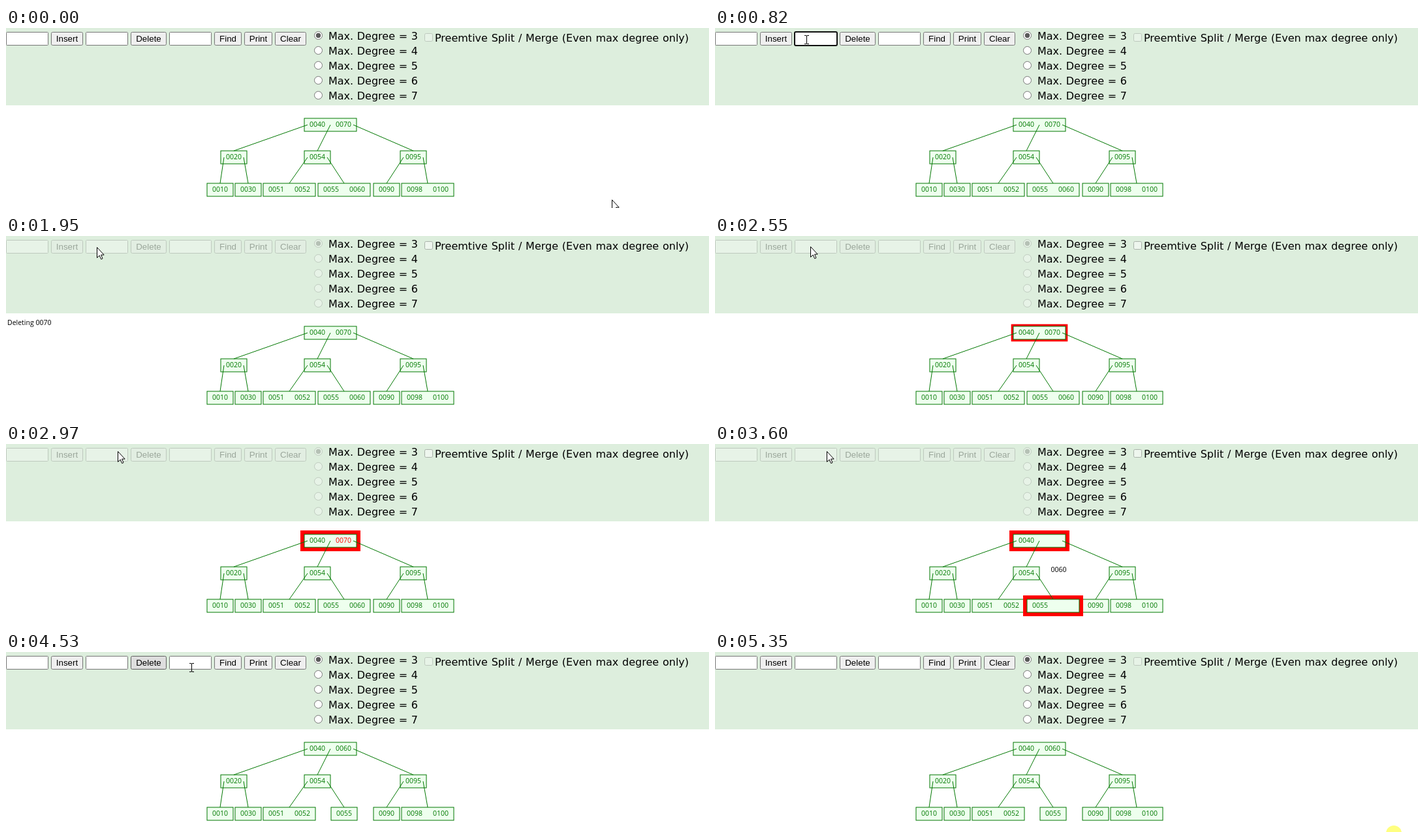
Animation, 1077 px wide and 277 px high, one loop 5420 ms. Source, as an HTML page:

```html
<!DOCTYPE html>
<html lang="en">
<head>
<meta charset="utf-8">
<title>B-tree deletion</title>
<style>
html, body { margin: 0; width: 100%; height: 100%; overflow: hidden; background: #fff; }
svg { display: block; }

.label { font: 16px "DejaVu Sans", sans-serif; word-spacing: .55px; }
.form text { font: 13.333px "Liberation Sans", Arial, sans-serif; }
.mid, .tree text { text-anchor: middle; }
.btn rect { y: 6.5px; height: 20px; rx: 2px; fill: #efefef; stroke: #767676; }
.field rect { y: 6.5px; width: 64px; height: 20px; rx: 1px; fill: #fff; stroke: #767676; }
.radio circle { fill: #fff; stroke: #767676; }
.radio .dot { fill: #5a5a5a; stroke: none; }

.tree text, .msg { font: 10.5px "Open Sans", "Noto Sans", sans-serif; }
.tree text { fill: #070; }
.tree rect { width: 40px; height: 20px; fill: #efe; stroke: #070; }
.tree rect.wide { width: 80px; }
.tree path { fill: none; stroke: #070; }
.tree rect.hot { fill: red; stroke: red; animation: pulse 5.42s linear infinite, 5.42s step-end infinite; }
.tree .moving { fill: #000; }

/* every timed part shares one clock */
.t { animation: 5.42s step-end infinite; }
.form { animation-name: disable; }
.box { animation-name: box; }
.ring { animation-name: ring; }
.key1 { animation-name: key1; }
.key2 { animation-name: key2; }
.caret { animation-name: key1, caret; animation-duration: 5.42s; animation-timing-function: step-end; animation-iteration-count: infinite; }
.msg { animation-name: msg; }
.btn rect.hover { animation-name: hover; }
.tree .hot.root { animation-name: pulse, hotRoot; }
.tree .hot.inner { animation-name: pulse, hotInner; }
.tree .hot.leaf { animation-name: pulse, hotLeaf; }
.old { animation-name: old; }
.new { animation-name: fresh; }
.pair { animation-name: pair; }
.taken { animation-name: taken; }
.single { animation-name: single; }
.moving { animation-name: move; }
.arrow { animation-name: arrow; }
.beam { animation-name: beam; }
.spot { animation-name: spot; }

@keyframes disable { 0% { opacity: 1 } 34.68% { opacity: .3 } 71.39%, 100% { opacity: 1 } }
@keyframes box { 0% { opacity: .3 } 34.68% { opacity: .5 } 83.57%, 100% { opacity: .3 } }
@keyframes ring { 0% { visibility: hidden } 12.73% { visibility: visible } 34.68%, 100% { visibility: hidden } }
@keyframes key1 { 0% { visibility: hidden } 26.19% { visibility: visible } 34.68%, 100% { visibility: hidden } }
@keyframes key2 { 0% { visibility: hidden } 28.04% { visibility: visible } 34.68%, 100% { visibility: hidden } }
@keyframes caret { 0% { transform: none } 28.04%, 100% { transform: translateX(7.4px) } }
@keyframes msg { 0% { visibility: hidden } 34.68% { visibility: visible } 42.06%, 100% { visibility: hidden } }
@keyframes hover { 0% { fill: #efefef; stroke: #767676 } 83.57% { fill: #dedede; stroke: #5f5f5f } 84.87%, 100% { fill: #efefef; stroke: #767676 } }

@keyframes pulse { 0%, 42.06% { stroke-width: 8.8px } 46.12% { stroke-width: 6px } 60.6% { stroke-width: 16px } 69%, 100% { stroke-width: 10.2px } }
@keyframes hotRoot { 0% { visibility: hidden } 42.06% { visibility: visible } 69%, 100% { visibility: hidden } }
@keyframes hotInner { 0% { visibility: hidden } 55.9% { visibility: visible } 62.54%, 100% { visibility: hidden } }
@keyframes hotLeaf { 0% { visibility: hidden } 63.83% { visibility: visible } 69%, 100% { visibility: hidden } }

@keyframes old { 0% { fill: #070; visibility: visible } 52.21% { fill: red; visibility: visible } 63.83%, 100% { fill: red; visibility: hidden } }
@keyframes fresh { 0% { visibility: hidden } 69%, 100% { visibility: visible } }
@keyframes pair { 0% { visibility: visible } 70.11%, 100% { visibility: hidden } }
@keyframes taken { 0% { visibility: visible } 63.83%, 100% { visibility: hidden } }
@keyframes single { 0% { visibility: hidden } 70.11%, 100% { visibility: visible } }
@keyframes move {
  0% { visibility: hidden; transform: none }
  63.83% { visibility: visible; transform: none }
  65.12% { visibility: visible; transform: translate(-5.8px, -27.5px) }
  66.41% { visibility: visible; transform: translate(-11.5px, -55px) }
  67.71% { visibility: visible; transform: translate(-17.3px, -82.5px) }
  69%, 100% { visibility: hidden; transform: none }
}

@keyframes arrow {
  0% { transform: translate(928px, 264px) }
  1.29% { transform: translate(905px, 257px) }
  2.58% { transform: translate(800px, 235px) }
  3.87% { transform: translate(650px, 195px) }
  5.16% { transform: translate(470px, 142px) }
  6.27% { transform: translate(298px, 88px) }
  7.56% { transform: translate(175px, 58px) }
  8.85% { transform: translate(114px, 44px) }
  10.14% { transform: translate(134px, 27px) }
  11.43% { transform: translate(0, 400px) }
  35.97% { transform: translate(139px, 17px) }
  42.06% { transform: translate(141px, 17px) }
  44.64% { transform: translate(146px, 16px) }
  47.23% { transform: translate(154px, 14px) }
  49.63% { transform: translate(161px, 13px) }
  50.92% { transform: translate(165px, 12px) }
  52.21% { transform: translate(169px, 11px) }
  53.5% { transform: translate(171px, 11px) }
  83.57% { transform: translate(0, 400px) }
  84.87% { transform: translate(340px, 42px) }
  86.16% { transform: translate(490px, 92px) }
  87.45% { transform: translate(660px, 148px) }
  88.74% { transform: translate(825px, 203px) }
  90.03% { transform: translate(963px, 249px) }
  91.32%, 100% { transform: translate(0, 400px) }
}
@keyframes beam {
  0% { transform: translate(0, 400px) }
  11.43% { transform: translate(139px, 20px) }
  12.73% { transform: translate(140px, 18px) }
  35.97% { transform: translate(0, 400px) }
  83.57% { transform: translate(284px, 24px) }
  84.87%, 100% { transform: translate(0, 400px) }
}
@keyframes spot { 0% { visibility: hidden } 98.7%, 100% { visibility: visible } }
</style>
</head>
<body>
<svg width="1077" height="277" viewBox="0 0 1077 277">
  <rect width="1077" height="119" fill="#ded"/>

  <g class="form t">
    <g class="field">
      <rect x=".5"/><rect x="122.5"/><rect x="250.5"/>
    </g>
    <g class="btn mid">
      <rect x="69.5" width="48"/><text x="93.5" y="21">Insert</text>
      <rect class="hover t" x="191.5" width="54"/><text x="218.5" y="21">Delete</text>
      <rect x="319.5" width="41"/><text x="340" y="21">Find</text>
      <rect x="365.5" width="42"/><text x="386.5" y="21">Print</text>
      <rect x="412.5" width="47"/><text x="436" y="21">Clear</text>
    </g>
    <g class="radio">
      <circle cx="478.5" cy="11.5" r="6"/><circle class="dot" cx="478.5" cy="11.5" r="3.7"/>
      <circle cx="478.5" cy="34.5" r="6"/>
      <circle cx="478.5" cy="57.5" r="6"/>
      <circle cx="478.5" cy="80.5" r="6"/>
      <circle cx="478.5" cy="103.5" r="6"/>
    </g>
    <rect class="ring t" x="122" y="6" width="65" height="21" rx="2" fill="none" stroke="#101010" stroke-width="2"/>
    <text class="key1 t" x="125" y="21">7</text>
    <text class="key2 t" x="132.4" y="21">0</text>
    <rect class="caret" x="132.6" y="9" width="1" height="15"/>
  </g>
  <rect class="box t" x="641.5" y="8.5" width="12" height="12" rx="2" fill="#fff" stroke="#767676"/>

  <g class="label">
    <text x="494" y="18">Max. Degree = 3</text>
    <text x="494" y="41">Max. Degree = 4</text>
    <text x="494" y="64">Max. Degree = 5</text>
    <text x="494" y="87">Max. Degree = 6</text>
    <text x="494" y="110">Max. Degree = 7</text>
    <text x="657" y="21" style="word-spacing:.7px">Preemtive Split / Merge (Even max degree only)</text>
  </g>

  <text class="msg t" x="2" y="137">Deleting 0070</text>

  <g class="tree">
    <rect x="329" y="189"/><text x="349" y="202">0020</text>
    <rect x="604" y="189"/><text x="624" y="202">0095</text>
    <rect x="308" y="239"/><text x="328" y="252">0010</text>
    <rect x="351" y="239"/><text x="371" y="252">0030</text>
    <rect class="wide" x="394" y="239"/><text x="414" y="252">0051</text><text x="454" y="252">0052</text>
    <rect x="563" y="239"/><text x="583" y="252">0090</text>
    <rect class="wide" x="606" y="239"/><text x="626" y="252">0098</text><text x="666" y="252">0100</text>

    <rect class="hot root wide" x="457" y="139"/>
    <rect class="hot inner" x="457" y="189"/>
    <rect class="hot leaf wide" x="478" y="239"/>

    <rect class="wide" x="457" y="139"/><text x="477" y="152">0040</text>
    <text class="old t" x="517" y="152">0070</text>
    <text class="new t" x="517" y="152">0060</text>
    <rect x="457" y="189"/><text x="477" y="202">0054</text>
    <g class="pair t">
      <rect class="wide" x="478" y="239"/><text x="498" y="252">0055</text>
      <text class="taken t" x="538" y="252">0060</text>
    </g>
    <g class="single t">
      <rect x="498" y="239"/><text x="518" y="252">0055</text>
    </g>

    <path d="M462 149L349 189M497 149L477 189M532 149L624 189
      M334 199L328 239M364 199L371 239M462 199L434 239M492 199L518 239
      M609 199L583 239M639 199L646 239"/>
    <text class="moving t" x="538" y="252">0060</text>
  </g>

  <circle class="spot t" cx="1040" cy="279" r="12" fill="#ffff80"/>
  <path class="beam t" d="M-3 -6.5H-1L.5 -6L2 -6.5H4M.5 -6V6M-3 6.5H-1L.5 6L2 6.5H4" fill="none" stroke="#000"/>
  <path class="arrow t" d="M.5 .5V16.5L4.2 13L6.7 18.7L9 17.7L6.6 12.1H11.2Z" fill="#fff" stroke="#000"/>
</svg>
</body>
</html>
```
